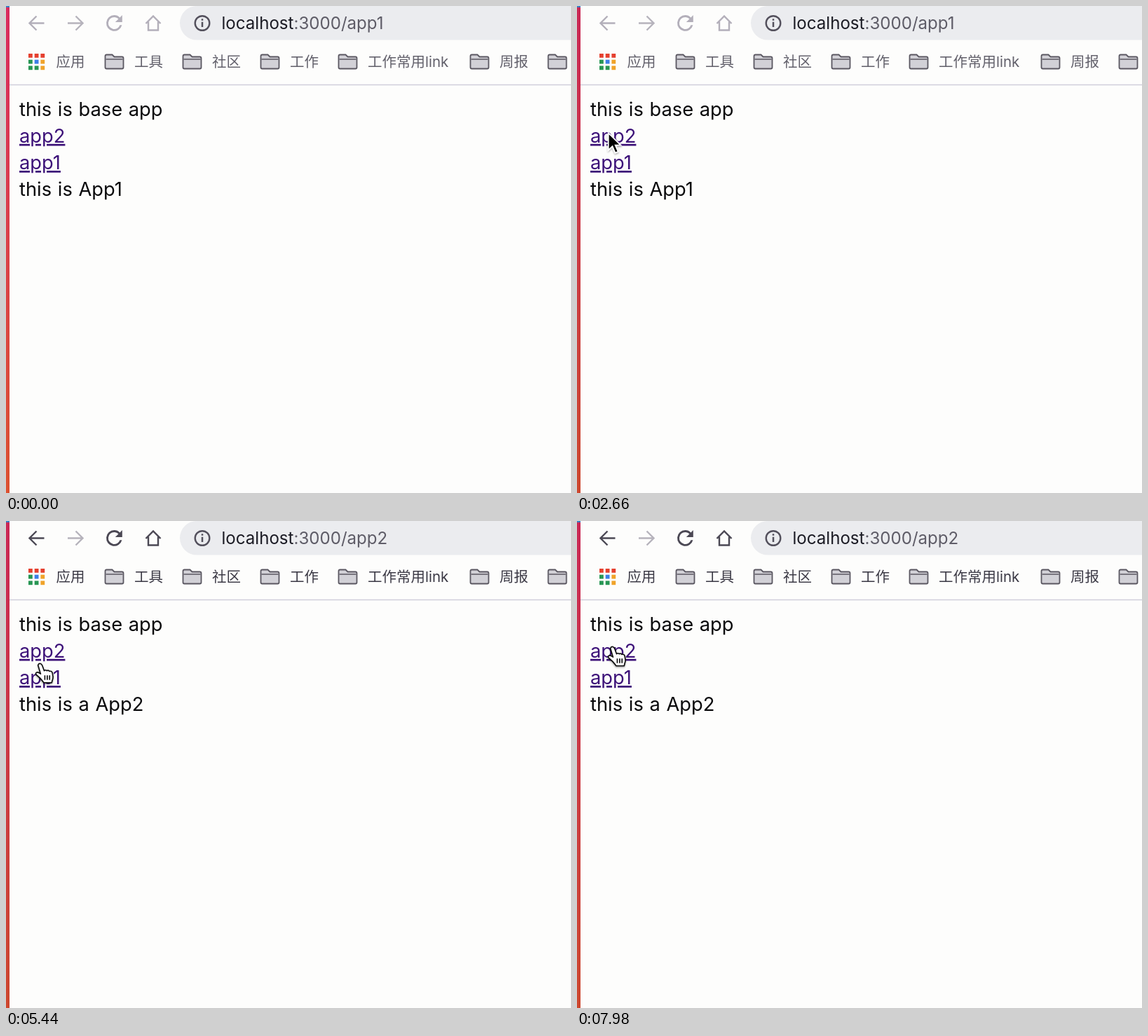
An HTML page for the animation above (8 s loop, 806 by 695 pixels).

```html
<!DOCTYPE html>
<html lang="zh">
<head>
<meta charset="utf-8">
<style>
  html, body { margin: 0; width: 100%; height: 100%; overflow: hidden; background: #fdfdfc; }
  svg { display: block; width: 806px; height: 695px; }
  text { font-family: Inter, "Noto Sans CJK SC", "Noto Sans CJK", sans-serif; }
  .page { font-size: 27.3px; word-spacing: 1px; fill: #09090b; }
  .link { fill: #3d1279; text-decoration: underline; text-decoration-thickness: 2px; text-underline-offset: 2px; }
  .url { font-size: 24.1px; fill: #1b1b24; }
  .url tspan { fill: #5e5c67; }
  .bookmark { font-size: 20.5px; fill: var(--label); }
  .icon { fill: none; stroke: var(--icon); stroke-width: 2.4; }
  svg { --icon: #b3afba; --label: #62606b; }
  svg.focused { --icon: #4b4854; --label: #3b3945; }
  .disabled { stroke: #b6b3bc; }
</style>
</head>
<body>
<svg id="stage" viewBox="0 0 806 695">
  <defs>
    <linearGradient id="desktop" x2="0" y2="1">
      <stop offset="0" stop-color="#d92b5e"/>
      <stop offset=".45" stop-color="#da3f4b"/>
      <stop offset="1" stop-color="#dc5130"/>
    </linearGradient>
    <filter id="shadow" x="-50%" y="-50%" width="200%" height="200%">
      <feDropShadow dx="0" dy="1.5" stdDeviation="1.3" flood-opacity=".35"/>
    </filter>
    <g id="folder">
      <path d="M1 3q0-2 2-2h8l3 3h11q2 0 2 2v13q0 2-2 2H3q-2 0-2-2z" fill="#d2d1d7" stroke="#5a5761" stroke-width="1.8"/>
      <path d="M2 7.5h24" stroke="#5a5761" stroke-width="1.5"/>
    </g>
  </defs>

  <rect width="806" height="695" fill="#fdfdfc"/>
  <rect width="5" height="695" fill="url(#desktop)"/>
  <rect id="shade" width="5" height="695" fill="#7a1428" opacity="0"/>
  <rect width="5" height="2" fill="#3d7fc4"/>

  <rect x="248" y="0" width="600" height="48.5" rx="24.2" fill="#ebecef"/>
  <path d="M5 112.5H806" stroke="#d0cedb" stroke-width="1.4"/>

  <path class="icon" d="M54.5 24.5H34M43.5 14.5l-10 10 10 10"/>
  <path class="icon disabled" d="M88 24.5h21M99.5 14.5l10 10-10 10"/>
  <path transform="translate(137.4 7.4) scale(1.42)" style="fill:var(--icon)"
    d="M17.65 6.35A7.96 7.96 0 0 0 12 4a8 8 0 1 0 7.73 10h-2.08A6 6 0 1 1 12 6c1.66 0 3.14.69 4.22 1.78L13 11h7V4z"/>
  <path class="icon" d="M199.5 25L210 14.5 220.5 25M203 22.5v12h14v-12"/>
  <circle cx="280" cy="24.5" r="10.3" fill="none" stroke="#53505c" stroke-width="2.4"/>
  <path d="M280 18.2v2.5M280 22.8v7.3" stroke="#53505c" stroke-width="2.5"/>
  <text class="url" x="307.5" y="33">localhost<tspan id="path"></tspan></text>

  <g id="bookmarks"></g>

  <g class="page">
    <text x="19" y="156.5">this is base app</text>
    <text class="link" x="19" y="194.8">app2</text>
    <text class="link" x="19" y="233">app1</text>
    <text id="content" x="19" y="271.3"></text>
  </g>

  <g id="arrow" filter="url(#shadow)">
    <path d="M0 1v24.5l5.800-5.300 4 9.300 4.200-1.800-4-9.100h7.700z" fill="#050505" stroke="#fff" stroke-width="1.8"/>
  </g>
  <g id="hand" filter="url(#shadow)">
    <g transform="translate(0 -1) scale(.93)" stroke="#101010" stroke-width="1.8" stroke-linejoin="round">
      <path fill="#fff" d="M-2.5 3q1-3 3.500-2.500 2 .5 3 3l3 8q1.500-2 4 0 2.500-1.500 4 .8 3.500-1 4.500 2.500l1 6q0 3-1 5l-1 4h-12q-5-7-11-11.500-2.500-2.500-.5-4 2-1.500 6.500 2z"/>
      <path d="M8 18.500v7M11.700 18.500v7M15.300 18.500v7"/>
    </g>
  </g>
</svg>

<script>
const LOOP = 8000;
const $ = id => document.getElementById(id);

const red = '#e5402f', green = '#279653', blue = '#3c7fe8', yellow = '#f0a32a';
const appsIcon = [red, red, red, green, blue, yellow, green, green, yellow]
  .map((color, i) => `<rect x="${32 + i % 3 * 8.7}" y="${68 + Math.floor(i / 3) * 8.7}" width="5.8" height="5.8" fill="${color}"/>`);
const folders = [[140.5, '工具'], [251.5, '社区'], [362.5, '工作'], [473.5, '工作常用link'], [661.5, '周报'], [772.5, '']]
  .map(([x, name]) => `<use href="#folder" x="${x}" y="68.5"/><text class="bookmark" x="${x + 42.5}" y="87">${name}</text>`);
$('bookmarks').innerHTML = appsIcon.join('') + '<text class="bookmark" x="71.5" y="87">应用</text>' + folders.join('');

// Pointer tip: time, x, y
const pointer = [
  [100, 779, 650], [700, 303, 583], [900, 300, 579], [1200, 294, 562], [1300, 294, 562],
  [1560, 172, 371], [1800, 95, 268], [2120, 51, 207], [2400, 46, 184], [2800, 44, 178],
  [3700, 44, 178], [3701, 50, 180], [4950, 50, 182], [5300, 48, 204], [5440, 48, 204],
  [5760, 47, 209], [6580, 47, 209], [6880, 50, 187], [7200, 50, 180], [8000, 50, 180]
];

function pointerAt(t) {
  const i = pointer.findIndex(key => key[0] > t);
  const [t0, x0, y0] = pointer[i - 1], [t1, x1, y1] = pointer[i];
  const k = (t - t0) / (t1 - t0);
  return [x0 + (x1 - x0) * k, y0 + (y1 - y0) * k];
}

function draw(t) {
  const onApp2 = t >= 4500 && t < 6100 || t >= 7600;
  const linkCursor = t >= 3700;
  $('stage').classList.toggle('focused', t >= 3500);
  $('shade').setAttribute('opacity', t >= 2500 ? .16 : 0);
  $('path').textContent = onApp2 ? ':3000/app2' : ':3000/app1';
  $('content').textContent = onApp2 ? 'this is a App2' : 'this is App1';

  const visible = t >= pointer[0][0];
  $('arrow').style.display = visible && !linkCursor ? '' : 'none';
  $('hand').style.display = linkCursor ? '' : 'none';
  if (visible) $(linkCursor ? 'hand' : 'arrow').setAttribute('transform', `translate(${pointerAt(t)})`);
}

const start = performance.now();
function tick() {
  draw((performance.now() - start) % LOOP);
  requestAnimationFrame(tick);
}
tick();
</script>
</body>
</html>
```
